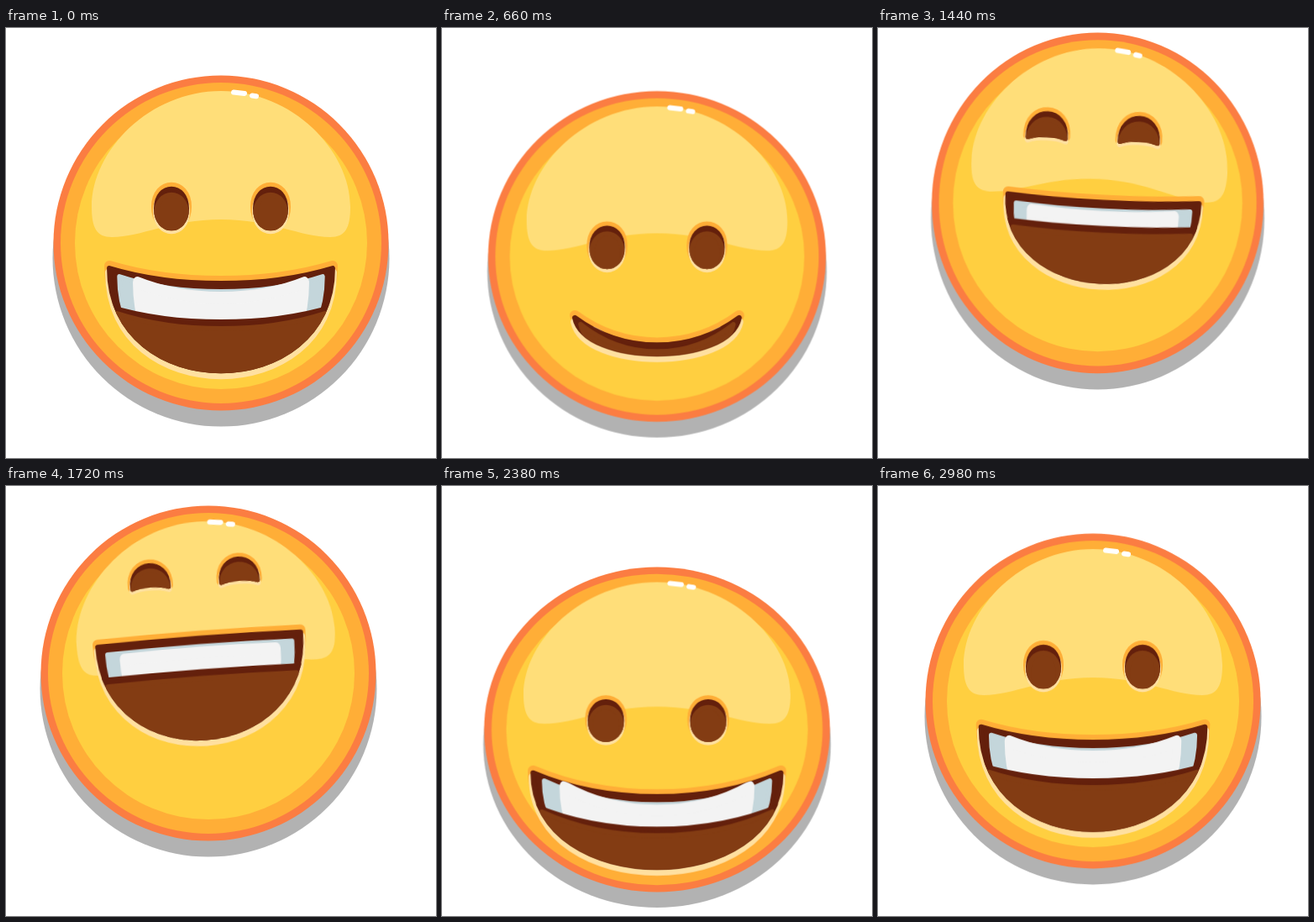
An HTML page without scripts that plays this animation: 512 by 512 pixels, repeating every 3 s.

```html
<!DOCTYPE html>
<html lang="en">
<head>
<meta charset="utf-8">
<title>Laughing face</title>
<style>
html, body { margin: 0; width: 100%; height: 100%; overflow: hidden; background: #fff; }
svg { display: block; width: 100vw; height: 100vh; stroke-width: 6; stroke-linejoin: round; }

.dark { fill: #64200c; stroke: #64200c; }
.brown { fill: #833c13; stroke: #833c13; }
.rim { fill: #ffae37; stroke: #ffae37; stroke-width: 12; }
.glow { fill: #ffe0a0; stroke: #ffe0a0; stroke-width: 10; }
.thin { stroke-width: 8; }
.teeth { fill: #c4d6db; stroke: #c4d6db; }
.white { fill: #f3f3f3; stroke: #f3f3f3; stroke-width: 14; }

.body, .tilt, .eyes, .mouth, .drop { animation: 3s ease-in-out infinite; }
.body { animation-name: bounce; }
.tilt { animation-name: tilt; }
.eyes { animation-name: look; }
.mouth { animation-name: shift; }
.drop { animation-name: drop; }

@keyframes bounce {
  0%, 100% { transform: translate(256px, 256px); }
  10% { transform: translate(256px, 276px) scale(1.053, .95); }
  22% { transform: translate(256px, 272px) scale(1.008, .987); }
  29% { transform: translate(256px, 303px) scale(1.062, .94); animation-timing-function: ease-in; }
  37% { transform: translate(238px, 266px) scale(1.03, .99); animation-timing-function: linear; }
  40% { transform: translate(239.5px, 241px) scale(1.008, .99); animation-timing-function: ease-out; }
  47% { transform: translate(262px, 208px) scale(.99, 1.017); }
  57.33% { transform: translate(241px, 223px); }
  65% { transform: translate(271px, 230px); animation-timing-function: ease-in; }
  71.33% { transform: translate(263.5px, 248px); animation-timing-function: ease-out; }
  79.33% { transform: translate(256px, 290px) scale(1.032, .97); }
  83% { transform: translate(256px, 285px) scale(1.053, .95); }
}
@keyframes tilt {
  0%, 29%, 79.33%, 100% { transform: rotate(0deg); }
  40% { transform: rotate(-5deg); }
  47%, 65% { transform: rotate(3deg); }
  57.33% { transform: rotate(-4.3deg); }
  71.33% { transform: rotate(2deg); }
}
@keyframes look {
  0%, 100% { transform: translate(0, -41px); }
  22%, 79.33% { transform: translate(0, -11px); }
  29% { transform: translate(0, -2px); }
  40% { transform: translate(-11px, -61px) scale(.97); }
  57.33% { transform: translate(-8px, -119px) scale(.9); }
  71.33% { transform: translate(7px, -64px) scale(.95); }
}
@keyframes shift {
  0%, 29%, 79.33%, 100% { transform: translateX(0); }
  40% { transform: translateX(-10px); }
  47%, 65%, 71.33% { transform: translateX(7px); }
  57.33% { transform: translateX(-8px); }
}
/* how far the teeth show below the upper lip */
@keyframes drop {
  0%, 100% { transform: translateY(46px); }
  22%, 29% { transform: translateY(0); }
  40% { transform: translateY(23px); }
  57.33%, 71.33%, 79.33% { transform: translateY(40px); }
}
</style>
</head>
<body>
<svg viewBox="0 0 512 512">
<defs>
  <path id="eye" d="M-18 0C-18 -31 18 -31 18 0C18 31 -18 31 -18 0Z">
    <animate attributeName="d" dur="3s" repeatCount="indefinite" keyTimes="0;.29;.4;.7133;.7933;1"
      values="M-18 0C-18 -31 18 -31 18 0C18 31 -18 31 -18 0Z;
        M-18 0C-18 -31 18 -31 18 0C18 31 -18 31 -18 0Z;
        M-24 14C-26 -26 26 -26 24 14C12 9 -12 9 -24 14Z;
        M-24 14C-26 -26 26 -26 24 14C12 9 -12 9 -24 14Z;
        M-18 0C-18 -31 18 -31 18 0C18 31 -18 31 -18 0Z;
        M-18 0C-18 -31 18 -31 18 0C18 31 -18 31 -18 0Z"/>
  </path>
  <!-- upper lip curve, then the bowl -->
  <path id="lip" d="M-133 30C-53 54 53 54 133 30C133 193 -133 193 -133 30Z">
    <animate attributeName="d" dur="3s" repeatCount="indefinite" keyTimes="0;.22;.4;.5733;.7133;.7933;1"
      values="M-133 30C-53 54 53 54 133 30C133 193 -133 193 -133 30Z;
        M-97 74C-39 118 39 118 97 74C85 132 -85 132 -97 74Z;
        M-110 26C-44 38 44 38 110 26C110 131 -110 131 -110 26Z;
        M-121 -41C-48 -43 48 -43 121 -41C121 115 -121 115 -121 -41Z;
        M-133 12C-53 23 53 23 133 12C133 164 -133 164 -133 12Z;
        M-143 53C-57 92 57 92 143 53C143 208 -143 208 -143 53Z;
        M-133 30C-53 54 53 54 133 30C133 193 -133 193 -133 30Z"/>
  </path>
  <mask id="inEye" maskUnits="userSpaceOnUse" x="-50" y="-50" width="100" height="100">
    <use href="#eye" fill="#fff" stroke="#fff"/>
  </mask>
  <mask id="inMouth" maskUnits="userSpaceOnUse" x="-200" y="-200" width="400" height="450">
    <use href="#lip" fill="#fff" stroke="#fff"/>
  </mask>
  <g id="fullEye">
    <use href="#eye" y="-2" class="rim"/>
    <use href="#eye" y="3" class="glow thin"/>
    <use href="#eye" class="dark"/>
    <g mask="url(#inEye)"><use href="#eye" y="7" class="brown"/></g>
  </g>
</defs>

<g class="body">
  <circle cy="18" r="200.5" opacity=".3"/>
  <circle r="199.5" fill="#fb7d42"/>
  <circle r="191" fill="#ffae37"/>
  <circle r="174" fill="#ffcf40"/>
  <g class="tilt">
    <path fill="#ffde79" d="M-154 -43C-154 -110 -85 -181 0 -181S154 -110 154 -43C154 -18 148 -7 130 -7C95 -7 60 -28 0 -28S-95 -7 -130 -7C-148 -7 -154 -18 -154 -43Z"/>
    <path d="M15 -179.5L28 -178M37 -175.5l5 .8" stroke="#fff" stroke-linecap="round"/>
    <g class="eyes">
      <use href="#fullEye" x="-59"/>
      <use href="#fullEye" x="59"/>
    </g>
    <g class="mouth">
      <use href="#lip" y="-3" class="rim"/>
      <use href="#lip" y="5" class="glow"/>
      <use href="#lip" class="dark"/>
      <!-- the inside reuses the lip shape, shifted and narrowed -->
      <g mask="url(#inMouth)">
        <use href="#lip" transform="translate(0 10) scale(.91 1)" class="teeth"/>
        <use href="#lip" transform="translate(0 17) scale(.75 1)" class="white"/>
        <g class="drop">
          <use href="#lip" class="dark"/>
          <use href="#lip" transform="translate(0 8) scale(.93 1)" class="brown"/>
        </g>
      </g>
    </g>
  </g>
</g>
</svg>
</body>
</html>
```
